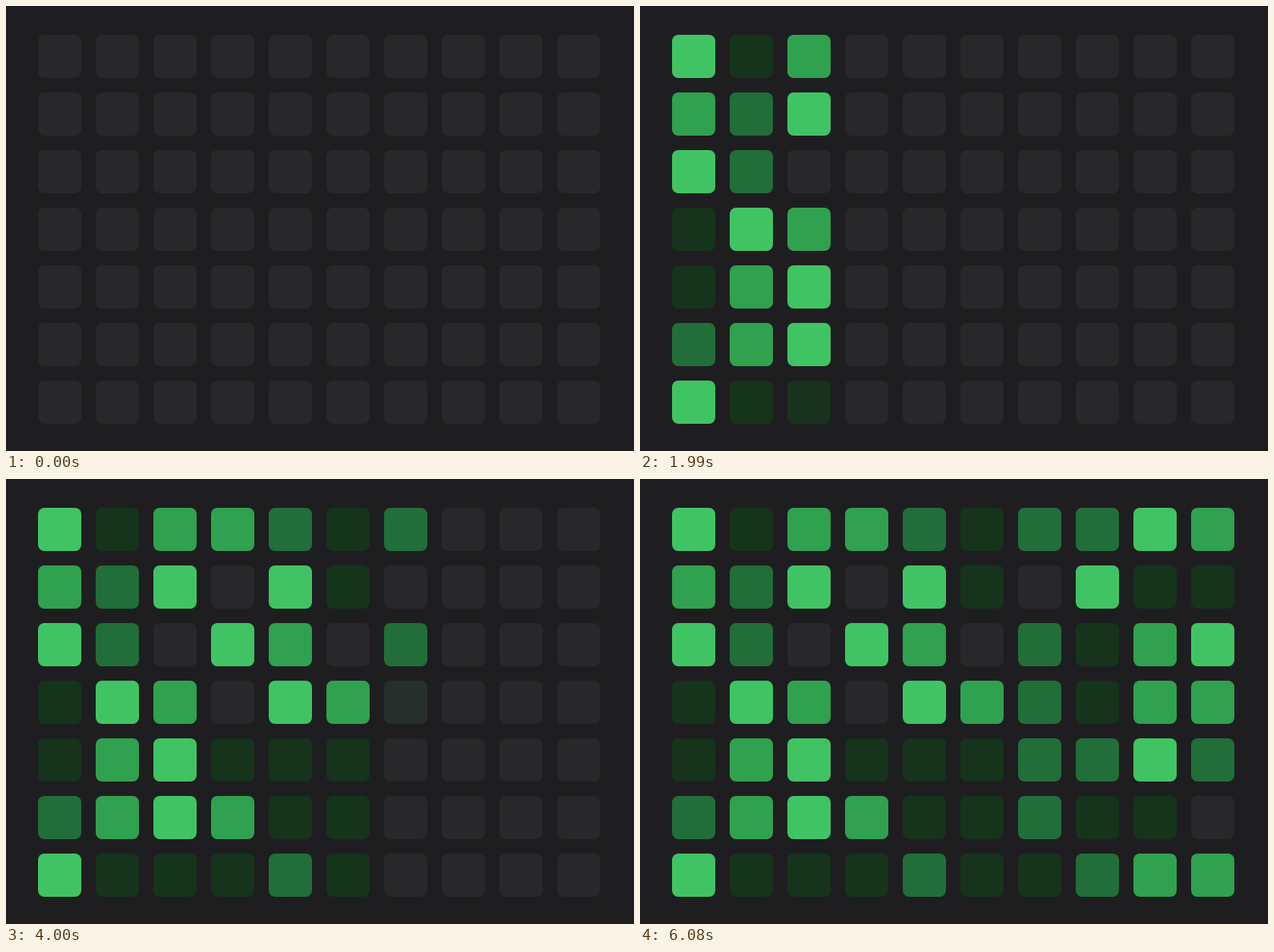
An HTML page that plays this animation: 784 by 556 pixels, repeating every 6.28 s.

```html
<!DOCTYPE html>
<html lang="en">
<head>
<meta charset="utf-8">
<title>Contribution grid</title>
<style>
  html, body { margin: 0; width: 100%; height: 100%; overflow: hidden; background: #1e1e20; }
  svg { display: block; width: 784px; height: 556px; }
</style>
</head>
<body>
<svg id="stage" viewBox="0 0 784 556"></svg>
<script>
const LOOP = 6280;
const START = 289;      // first cell begins to fill
const STAGGER = 82.3;   // delay between neighbouring cells
const FADE = 60;
const TICK = 69.3;      // the picture advances in discrete ticks
const TICK_OFFSET = 318;
const TICK_PHASE = 8;

const PITCH = 72, SIZE = 54, RADIUS = 8, LEFT = 40, TOP = 36;

// Activity level of each cell, one string per column, top to bottom.
const columns = [
  '4341124', '1224331', '3403441', '3040131', '2434112',
  '1103111', '2022221', '2411212', '4133413', '3143203'
];

const palette = [
  [40, 40, 42],
  [22, 51, 28],
  [33, 110, 57],
  [48, 161, 78],
  [64, 196, 99]
];

const stage = document.getElementById('stage');

function addCell(level, col, row) {
  const rect = document.createElementNS('http://www.w3.org/2000/svg', 'rect');
  const attrs = {
    x: LEFT + col * PITCH, y: TOP + row * PITCH,
    width: SIZE, height: SIZE, rx: RADIUS
  };
  for (const name in attrs) rect.setAttribute(name, attrs[name]);
  stage.appendChild(rect);
  return { rect, color: palette[level] };
}

const cells = columns.flatMap((levels, col) =>
  [...levels].map((level, row) => addCell(+level, col, row)));

const clamp01 = v => Math.min(1, Math.max(0, v));

function mix(from, to, k) {
  return `rgb(${from.map((v, i) => Math.round(v + (to[i] - v) * k))})`;
}

function render(time) {
  const tick = Math.floor((time - TICK_OFFSET) / TICK);
  const now = TICK_OFFSET + TICK_PHASE + tick * TICK;
  cells.forEach(({ rect, color }, i) => {
    const k = tick < 0 ? 0 : clamp01((now - START - i * STAGGER) / FADE);
    rect.setAttribute('fill', mix(palette[0], color, k));
  });
}

const origin = performance.now();

function loop() {
  render((performance.now() - origin) % LOOP);
  requestAnimationFrame(loop);
}

render(0);
requestAnimationFrame(loop);
</script>
</body>
</html>
```
